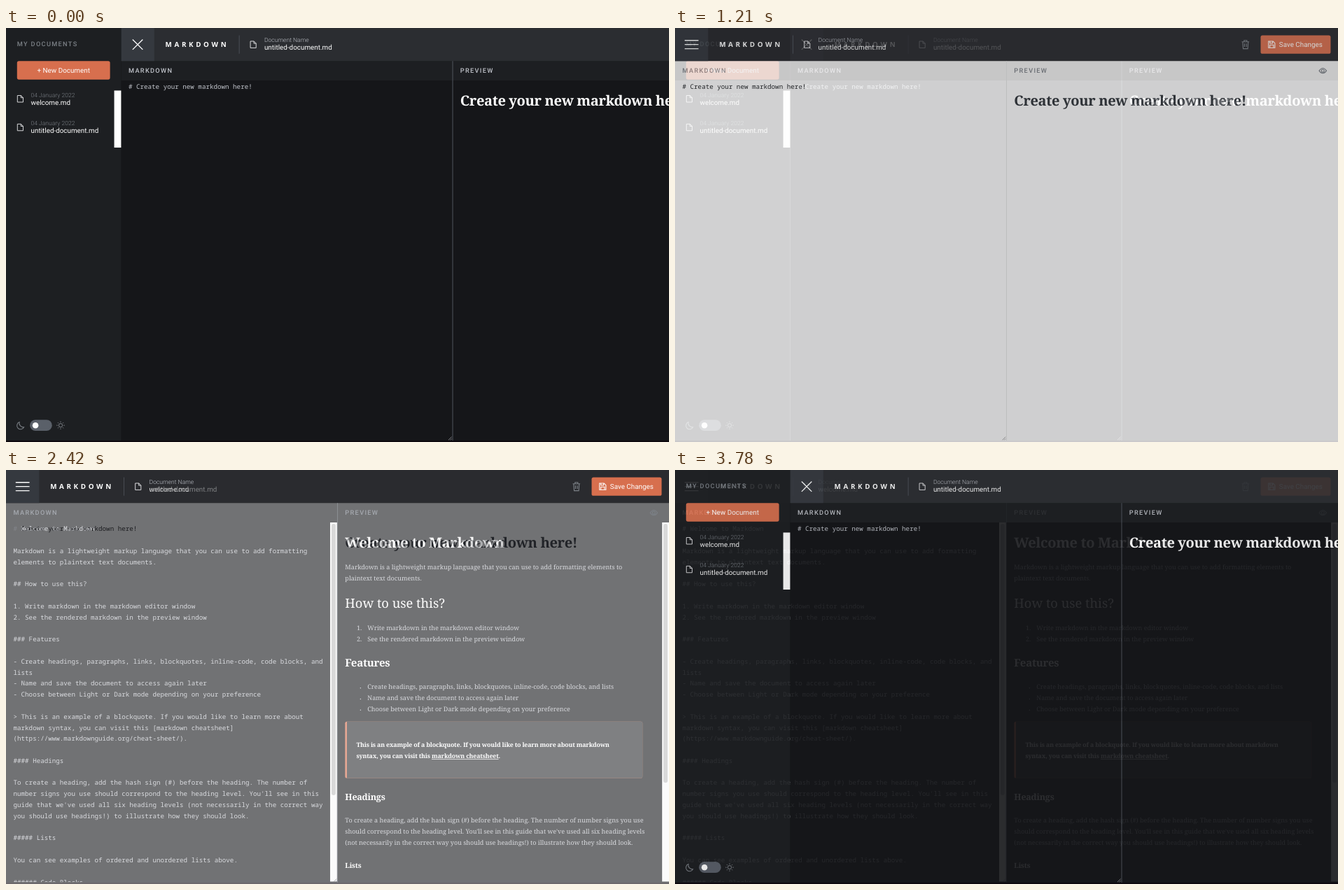
Animation of 947 by 592 pixels, one loop 3.81 s. Source, as an HTML page with a canvas:

```html
<!DOCTYPE html>
<html lang="en">
<head>
<meta charset="utf-8">
<title>Markdown editor</title>
<style>
html, body { margin: 0; width: 100%; height: 100%; overflow: hidden; background: #151619; }
canvas { display: block; width: 947px; height: 592px; }
</style>
</head>
<body>
<canvas id="stage" width="947" height="592"></canvas>
<script>
const W = 947, H = 592, UNIT = W / 1440; // layout is drawn on a 1440-wide grid
const UI = 'Roboto, sans-serif';
const MONO = '"Noto Sans Mono", monospace';
const SLAB = '"Noto Serif", serif';
const ACCENT = '#d76f4e', GREY = '#7c8187', LINE = '#5a6069', SILVER = '#c1c4cb';

const DARK = { header: '#2b2d31', bar: '#1d1f22', page: '#151619', label: SILVER,
  code: SILVER, title: '#fff', rule: LINE, eye: GREY, grip: '#a0a2a5', foot: '#0e090f' };
const LIGHT = { header: '#292a2e', bar: '#f2f1f1', page: '#fefefe', label: GREY,
  code: '#25272b', title: '#35393f', rule: '#e4e4e4', eye: GREY, grip: '#8d8d8d', foot: '#fafafa' };

const UNTITLED = { name: 'untitled-document.md', lines: ['# Create your new markdown here!'] };
const WELCOME = { name: 'welcome.md', lines: `# Welcome to Markdown

Markdown is a lightweight markup language that you can use to add formatting
elements to plaintext text documents.

## How to use this?

1. Write markdown in the markdown editor window
2. See the rendered markdown in the preview window

### Features

- Create headings, paragraphs, links, blockquotes, inline-code, code blocks, and
lists
- Name and save the document to access again later
- Choose between Light or Dark mode depending on your preference

> This is an example of a blockquote. If you would like to learn more about
markdown syntax, you can visit this [markdown cheatsheet]
(https://www.markdownguide.org/cheat-sheet/).

#### Headings

To create a heading, add the hash sign (#) before the heading. The number of
number signs you use should correspond to the heading level. You'll see in this
guide that we've used all six heading levels (not necessarily in the correct way
you should use headings!) to illustrate how they should look.

##### Lists

You can see examples of ordered and unordered lists above.

###### Code Blocks`.split('\n') };

let g;

function rect(x, y, w, h, color, r = 0) {
  g.fillStyle = color;
  g.beginPath();
  g.roundRect(x, y, w, h, r);
  g.fill();
}

function dot(x, y, r, color) {
  g.fillStyle = color;
  g.beginPath();
  g.arc(x, y, r, 0, 7);
  g.fill();
}

function text(str, x, y, color, size, family = UI, weight = 400, gap = 0, align = 'left') {
  g.font = `${weight} ${size}px ${family}`;
  g.letterSpacing = gap + 'px';
  g.textAlign = align;
  g.fillStyle = color;
  g.fillText(str, x, y);
}

function icon(path, x, y, color, width = 1.4) {
  g.save();
  g.translate(x, y);
  g.strokeStyle = color;
  g.lineWidth = width;
  g.stroke(new Path2D(path));
  g.restore();
}

const body = (str, x, y, align) => text(str, x, y, SILVER, 13.74, SLAB, 400, 0, align);
const bold = (str, x, y, size, color = '#fff') =>
  text(str, x, y, color, size * .955, SLAB, 700, size * -.018);
const label = (str, x, y, color) => text(str, x, y, color, 14, UI, 500, 2);
const fileIcon = (x, y) =>
  icon('M.8 .8H8.6L13.2 5.4V15.2H.8ZM8.4 .8V5.6H13.2', x, y, '#e8e8ea', 1.4);

function header(theme, name, open) {
  rect(0, 0, 1440, 72, theme.header);
  rect(0, 0, 72, 72, '#35393f');
  icon(open ? 'M25 25L47 47M47 25L25 47' : 'M21 27H51M21 36H51M21 45H51', 0, 0, '#fff', 2);
  text('MARKDOWN', 96, 41.6, '#fff', 15, '"Open Sans", sans-serif', 700, 5.5);
  rect(256, 16, 1, 40, LINE);
  fileIcon(280, 28);
  text('Document Name', 311, 30.3, SILVER, 13, UI, 300);
  text(name, 311, 47.4, '#fff', 15);
  icon('M1 4H17M6 4V1H12V4M3 4L4 19H14L15 4M7 8V15M11 8V15', 1230, 26, GREY, 1.7);
  rect(1272, 16, 152, 40, ACCENT, 4);
  icon('M1 1H11L15 5V15H1ZM4 1V5H10V1M4 15V9H12V15', 1288, 28, '#fff', 1.6);
  text('Save Changes', 1312, 41, '#fff', 15);
}

function code(lines, color) {
  g.save();
  g.beginPath();
  g.rect(0, 114, 720, 782);
  g.clip();
  lines.forEach((s, i) => text(s, 16, 133 + 24 * i, color, 14, MONO));
  g.restore();
}

function scrollbar(x, end) {
  rect(x, 114, 15, 781, '#fafafa');
  rect(x + 3, 117, 9, end - 117, '#c1c1c1', 4.5);
}

function welcomePreview(x) {
  body('Markdown is a lightweight markup language that you can use to add formatting elements to', x, 216.5);
  body('plaintext text documents.', x, 240.5);
  text('How to use this?', x, 299, '#fff', 27.8, SLAB, 300);
  ['Write markdown in the markdown editor window',
    'See the rendered markdown in the preview window'].forEach((s, i) => {
    body(i + 1 + '.', 773, 348 + 24 * i, 'right');
    body(s, 785, 348 + 24 * i);
  });
  bold('Features', x, 427.5, 24);
  ['Create headings, paragraphs, links, blockquotes, inline-code, code blocks, and lists',
    'Name and save the document to access again later',
    'Choose between Light or Dark mode depending on your preference'].forEach((s, i) => {
    dot(770, 474 + 24 * i, 1.1, SILVER);
    body(s, 785, 476 + 24 * i);
  });
  rect(x, 547, 646, 123, ACCENT, 4);
  rect(x + 4, 547, 642, 123, '#2b2d31', [0, 4, 4, 0]);
  bold('This is an example of a blockquote. If you would like to learn more about markdown', 761, 602, 14);
  let pen = 761;
  ['syntax, you can visit this ', 'markdown cheatsheet', '.'].forEach((s, i) => {
    bold(s, pen, 626, 14);
    const w = g.measureText(s).width;
    if (i === 1) rect(pen, 628, w, 1.2, '#fff');
    pen += w;
  });
  bold('Headings', x, 717.5, 20);
  ['To create a heading, add the hash sign (#) before the heading. The number of number signs you use',
    "should correspond to the heading level. You'll see in this guide that we've used all six heading levels",
    '(not necessarily in the correct way you should use headings!) to illustrate how they should look.']
    .forEach((s, i) => body(s, x, 767 + 24 * i));
  bold('Lists', x, 865.5, 16);
}

function sidebar() {
  rect(0, 0, 250, 901, '#1d1f22');
  label('MY DOCUMENTS', 24, 39.2, GREY);
  rect(24, 72, 202, 40, ACCENT, 4);
  text('+ New Document', 125, 97, '#fff', 15, UI, 400, 0, 'center');
  [WELCOME, UNTITLED].forEach((doc, i) => {
    const y = 62 * i;
    fileIcon(24, 146 + y);
    text('04 January 2022', 54, 150 + y, GREY, 13, UI, 300);
    text(doc.name, 54, 166.6 + y, '#fff', 15);
  });
  rect(235, 136, 15, 124, '#fff');
  icon('M5 1A8 8 0 1 0 15 12A9 9 0 0 1 5 1Z', 24, 856, GREY, 1.6);
  rect(52, 852, 48, 24, LINE, 12);
  dot(64, 864, 6.5, '#fff');
  let rays = 'M4 0A4 4 0 1 1 -4 0A4 4 0 1 1 4 0';
  for (let i = 0; i < 8; i++) {
    const c = Math.cos(i * Math.PI / 4), s = Math.sin(i * Math.PI / 4);
    rays += `M${6.4 * c} ${6.4 * s}L${8.8 * c} ${8.8 * s}`;
  }
  icon(rays, 118.6, 864, GREY, 1.5);
}

function scene(theme, doc, open) {
  const layer = document.createElement('canvas');
  layer.width = W;
  layer.height = H;
  g = layer.getContext('2d');
  g.scale(UNIT, UNIT);
  g.textRendering = 'geometricPrecision';
  const long = doc === WELCOME, px = 736.5;

  g.save();
  if (open) g.translate(250, 0);
  rect(0, 0, 1440, 901, theme.page);
  rect(0, 72, 1440, 42, theme.bar);
  header(theme, doc.name, open);
  label('MARKDOWN', 16, 97.6, theme.label);
  label('PREVIEW', px, 97.6, theme.label);
  icon('M0 6Q8 -5 16 6Q8 17 0 6ZM11 6A3 3 0 1 1 5 6A3 3 0 1 1 11 6', 1399, 87, theme.eye, 1.7);
  rect(719.5, 72, 1.3, 829, theme.rule);
  code(doc.lines, theme.code);
  bold(doc.lines[0].slice(2), px, 168.6, 32, theme.title);
  if (long) {
    welcomePreview(px);
    scrollbar(704, 707);
    scrollbar(1425, 680);
  }
  icon('M711 896L718 889M715 896L718 893', 0, 0, theme.grip, 1.2);
  g.restore();

  if (open) sidebar();
  rect(0, 897, 1440, 4, theme.foot);
  return layer;
}

const scenes = [scene(DARK, UNTITLED, true), scene(LIGHT, UNTITLED), scene(DARK, WELCOME)];
const stage = document.getElementById('stage').getContext('2d');
const LOOP = 3810, HOLD = 1000, STEP = 30, SLOT = 1270;

function frame(now) {
  const t = now % LOOP, i = Math.floor(t / SLOT), local = t - i * SLOT;
  stage.globalAlpha = 1;
  stage.drawImage(scenes[i], 0, 0);
  if (local >= HOLD) {
    stage.globalAlpha = Math.min(1, (Math.floor((local - HOLD) / STEP) + 1) / 10);
    stage.drawImage(scenes[(i + 1) % 3], 0, 0);
  }
  requestAnimationFrame(frame);
}

let start;
requestAnimationFrame(function begin(now) {
  start = now;
  frame(0);
  frame = (draw => time => draw(Math.max(0, time - start)))(frame);
});
</script>
</body>
</html>
```
